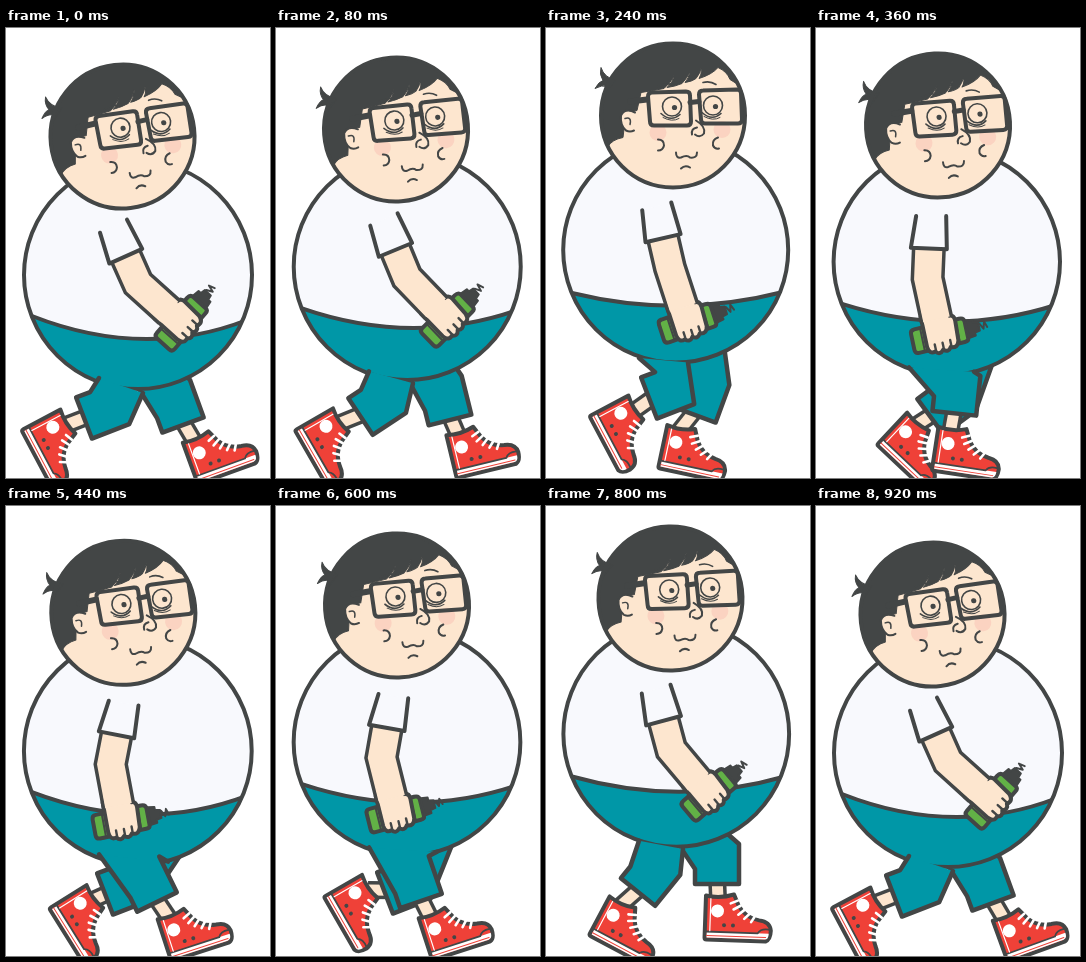
These frames come from a looping animation (264x450 px, 960 ms). An HTML page with a canvas:

```html
<!DOCTYPE html>
<html lang="en">
<head>
<meta charset="utf-8">
<title>Walking man</title>
<style>
  html, body { margin: 0; width: 100%; height: 100%; overflow: hidden; background: #fff; }
  canvas { display: block; width: 264px; height: 450px; }
</style>
</head>
<body>
<canvas id="stage"></canvas>
<script>
const W = 264, H = 450, LOOP = 960, STEP = 40;
const INK = '#434646', SKIN = '#fde6cf', SHIRT = '#f8f9fd', TEAL = '#0097a7',
      RED = '#ef4138', GREEN = '#62b146', BLUSH = '#fbd3c1', WHITE = '#fff';

const canvas = document.getElementById('stage');
const c = canvas.getContext('2d');
const dpr = window.devicePixelRatio || 1;
canvas.width = W * dpr;
canvas.height = H * dpr;

// time, bob (0 high, 1 low), upper arm angle, forearm angle
const TORSO = [
  [0, 1, -24, -48], [160, .33, -21, -40], [240, 0, -13, -18],
  [320, .25, -2, -13], [440, .92, 11, -10.6], [480, 1, 13, -10],
  [600, .57, 10, -14], [720, .03, -6, -28], [800, .24, -15, -40], [920, 1, -24, -48]
];
// time, hem x, hem y, hem angle, foot x, foot y, foot angle
const NEAR = [
  [0, 78, 390, 69, 61, 394, 62], [160, 91, 387, 44, 67, 391, 58],
  [240, 103, 370, 69, 89, 380, 62], [320, 132, 380, 22, 122, 397, 22],
  [440, 151, 396, -26, 165, 409, -18], [480, 152, 397, -27, 168, 410, -19],
  [600, 145, 395, -19, 156, 408, -18], [720, 119, 393, 10, 113, 403, 5],
  [800, 92, 386, 39, 76, 397, 28], [920, 78, 390, 69, 61, 394, 62]
];
const FAR = [
  [0, 177, 397, -20, 190, 410, -20], [160, 171, 387, -8, 178, 398, -7],
  [240, 149, 387, 20, 135, 400, 12], [320, 122, 389, 46, 108, 396, 36],
  [440, 99, 388, 69, 88, 391, 58], [480, 98, 389, 69, 86, 393, 60],
  [600, 109, 387, 69, 93, 381, 60], [720, 139, 381, 30, 138, 388, 28],
  [800, 171, 378, 0, 174, 390, 2], [920, 177, 397, -20, 190, 410, -20]
];

const rad = deg => deg * Math.PI / 180;

function pose(track, t) {
  let i = track.findIndex(k => k[0] > t);
  if (i < 0) return track[track.length - 1].slice(1);
  const a = track[i - 1], b = track[i], f = (t - a[0]) / (b[0] - a[0]);
  return a.slice(1).map((v, n) => v + (b[n + 1] - v) * f);
}

function shape(path, fill, width, stroke = INK) {
  const p = typeof path === 'string' ? new Path2D(path) : path;
  if (fill) { c.fillStyle = fill; c.fill(p); }
  if (width) { c.strokeStyle = stroke; c.lineWidth = width; c.stroke(p); }
}

function dot(x, y, r, fill, width) {
  const p = new Path2D();
  p.arc(x, y, r, 0, 7);
  shape(p, fill, width);
}

function poly(points) {
  return new Path2D('M' + points.map(p => p.join(',')).join('L'));
}

function at(x, y, deg, draw) {
  c.save();
  c.translate(x, y);
  c.rotate(rad(deg));
  draw();
  c.restore();
}

function shoe() {
  shape('M-14 0L-14 42Q-14 44-12 44L47 44Q52 42 52 33Q51 24 40 23Q26 21 19 9L14-2Q0 3-14 0Z', RED, 4);
  shape('M-12 36L50 36Q50 42 46 42L-12 42Z', WHITE);
  shape('M-13 36L39 36Q42 31 50 32', null, 1.8);
  shape('M-12 40L47 40', null, 1, RED);
  shape('M-9 3L-9 35', null, 1.2, WHITE);
  shape('M11 7l7-3M14 13l7-4M19 18l6-5M25 22l5-5M32 25l3-5', null, 2.6, WHITE);
  dot(-2, 15, 6.5, WHITE);
  dot(5, 29, 2, INK);
  dot(14, 29, 2, INK);
}

function leg([hx, hy, ha, fx, fy, fa], hipL, hipR) {
  const a = rad(ha), cos = Math.cos(a), sin = Math.sin(a);
  const p = (along, up) => [hx + cos * along + sin * up, hy + sin * along - cos * up];
  const ankle = poly([p(0, 8), [fx - 2 * Math.cos(rad(fa)), fy + 3]]);
  c.lineCap = 'butt';
  shape(ankle, null, 18);
  shape(ankle, null, 11, SKIN);
  c.lineCap = 'round';
  at(fx, fy, fa, shoe);
  shape(poly([hipL, p(-22, 15), p(-22, 0), p(22, 0), p(22, 40), hipR]), TEAL, 4.5);
}

function torso(b) {
  const x = 129.7 + 2.3 * b, y = 222 + 25 * b, r = 112.5 + 1.5 * b;
  const belly = new Path2D();
  belly.arc(x, y, r, 0, 7);
  const waist = `M10 ${260 + 23 * b}L26 ${265 + 23 * b}Q${132 + 6 * b} ${291 + 41 * b} ${237 + 4 * b} ${264 + 28 * b}L255 ${258 + 28 * b}`;
  shape(belly, SHIRT);
  c.save();
  c.clip(belly);
  shape(waist + 'L255 400L10 400Z', TEAL);
  shape(waist, null, 4);
  c.restore();
  shape(belly, null, 4);
}

function hand() {
  shape('M-24 47L22 46Q27 46 27 50L27 67Q27 70 23 70L-24 71Q-28 71-28 67L-28 51Q-28 47-24 47Z', GREEN, 4);
  shape('M-18 48L-18 70M18 48L18 69', null, 2);
  shape('M28 49L35 50L35 53L40 54L40 62L35 63L35 66L28 67Z', INK, 2);
  shape('M41 55l3 6l2-7l2 6', null, 2);
  shape('M-15 36L-15 67Q-14 75-8 73Q-4 78 0 73Q5 77 8 72Q15 75 17 67L18 47Q18 41 13 41L14 36Z', SKIN, 4);
  shape('M-7 73L-7 66M1 73L1 66M9 72L9 65', null, 2.4);
  shape('M-13 30L12 30L12 44L-13 44Z', SKIN);
}

function arm(b, up, fore) {
  const sx = 113.5 + .28 * up, sy = 179 + 20 * b, u = rad(up), f = rad(fore);
  const ex = sx - Math.sin(u) * 62, ey = sy + Math.cos(u) * 62;
  const bone = poly([
    [sx - Math.sin(u) * 26, sy + Math.cos(u) * 26], [ex, ey],
    [ex - Math.sin(f) * 42, ey + Math.cos(f) * 42]
  ]);
  c.lineCap = 'butt';
  c.lineJoin = 'miter';
  shape(bone, null, 34);
  c.lineCap = c.lineJoin = 'round';
  at(ex, ey, fore, hand);
  c.lineCap = 'butt';
  c.lineJoin = 'miter';
  shape(bone, null, 27, SKIN);
  c.lineCap = c.lineJoin = 'round';
  at(sx, sy, up, () => shape('M-14 0L-18 32L18 32L16-1', SHIRT, 4));
}

function eye(x, y) {
  dot(x, y, 9.5, SKIN, 1.6);
  dot(x + 2.5, y + 1, 2.6, INK);
  shape(`M${x - 11} ${y + 7}q10 9 19 1`, null, 1.6);
  shape(`M${x - 9} ${y + 11}q9 5 16 1`, null, 1);
}

function lens(x, y) {
  shape(`M${x + 4} ${y}L${x + 38} ${y - 1}Q42 0 42 0`.replace('Q42 0 42 0', `Q${x + 42} ${y - 1} ${x + 42} ${y + 3}`) +
    `L${x + 43} ${y + 29}Q${x + 43} ${y + 33} ${x + 39} ${y + 33}L${x + 6} ${y + 33}Q${x + 2} ${y + 33} ${x + 2} ${y + 29}L${x} ${y + 4}Q${x} ${y} ${x + 4} ${y}Z`, null, 4);
}

function head() {
  c.translate(-127, -87);
  dot(127, 87, 72, SKIN);
  dot(112, 104, 8.5, BLUSH);
  dot(176, 101, 8.5, BLUSH);
  // hair and tufts
  shape('M62 118Q66 111 77 109L80 84L91 82L95 64Q108 62 118 60Q125 54 128 47Q127 54 121 59Q129 58 136 55Q142 49 144 42Q143 50 139 54Q146 53 150 50Q154 45 155 40Q156 46 153 50Q166 46 172 39Q181 43 184 51L192 56A72 72 0 0 0 62 118Z', INK, 1);
  shape('M70 52Q58 49 55 39Q53 46 57 52Q53 53 49 60Q56 56 61 58L58 66Z', INK, 1);
  dot(127, 87, 72, null, 4);
  // ear
  shape('M90 85Q80 79 75 87Q74 97 80 102Q85 105 90 100Z', SKIN);
  shape('M89 84Q79 79 75 87Q74 97 80 102Q84 104 88 102', null, 2);
  shape('M79 90Q86 88 84 96', null, 1.5);
  // glasses
  eye(126, 78);
  eye(167, 77);
  shape('M112 58q8-4 15-2M157 54q7-2 13 2', null, 1.6);
  lens(102, 64);
  lens(153, 62);
  shape('M144 74L153 73', null, 5);
  shape('M101 71L84 73', null, 6);
  // nose, mouth, cheeks
  shape('M150 92Q160 98 158 105Q154 110 149 106M151 99Q145 100 146 106', null, 2);
  shape('M130 124q0 6 5 5q6-3 9 0q7 1 7-5M135 140q4-4 9-1', null, 2);
  shape('M112 111q6 0 6 6q-1 5-6 5M172 109q-6 2-5 8q2 4 6 3', null, 2);
}

function draw(t) {
  const [b, up, fore] = pose(TORSO, t), near = pose(NEAR, t), far = pose(FAR, t);
  const swing = Math.max(0, Math.min(1, (near[0] - 92) / 55));
  c.setTransform(dpr, 0, 0, dpr, 0, 0);
  c.fillStyle = WHITE;
  c.fillRect(0, 0, W, H);
  c.lineCap = c.lineJoin = 'round';
  leg(far, [126, 322 + 28 * b], [178, 318 + 28 * b]);
  torso(b);
  leg(near, [93, 330 + 20 * b], [137 + 25 * swing, 336 + 29 * b - 7 * swing]);
  arm(b, up, fore);
  at(127 - 10.5 * b, 87.5 + 21 * b, -6.5 * b, head);
}

const start = performance.now();
function tick() {
  const t = Math.max(0, performance.now() - start) % LOOP;
  draw(Math.floor(t / STEP) * STEP);
  requestAnimationFrame(tick);
}
tick();
</script>
</body>
</html>
```
